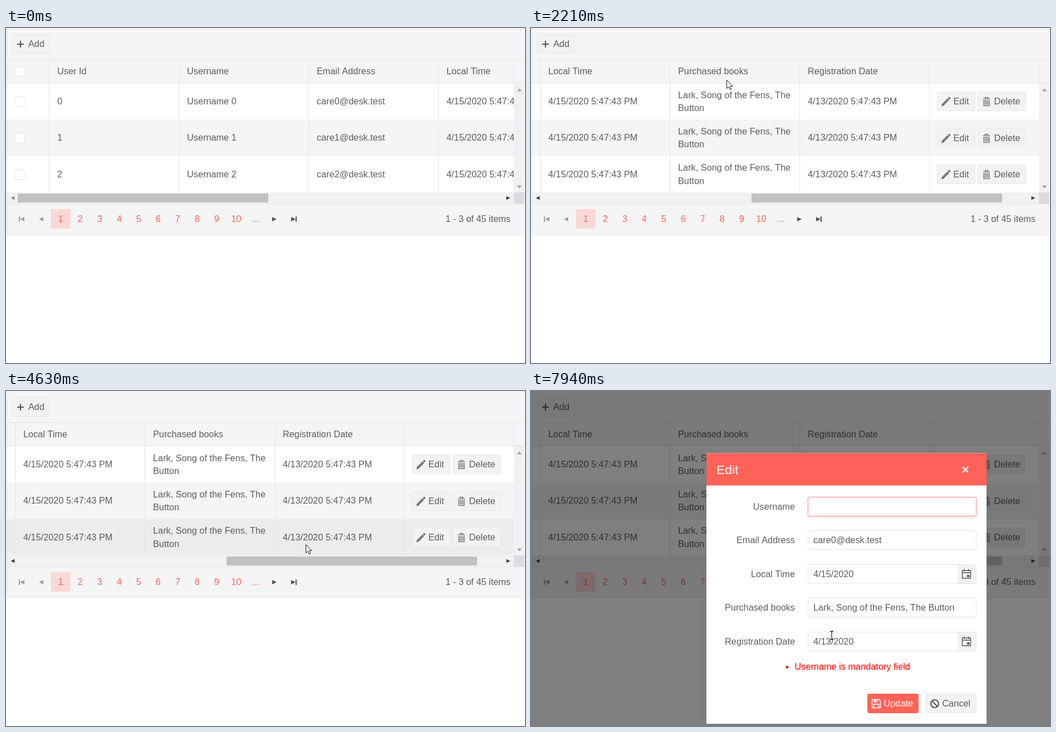
An HTML page with a canvas for the animation above (8 s loop, 932 by 601 pixels).

```html
<!DOCTYPE html>
<html lang="en">
<head>
<meta charset="utf-8">
<title>Grid with popup editing</title>
<style>
html, body { margin: 0; width: 932px; height: 601px; overflow: hidden; background: #fff; }
canvas { display: block; }
</style>
</head>
<body>
<canvas id="stage" width="932" height="601"></canvas>
<script>
const ctx = document.getElementById('stage').getContext('2d');
const LOOP = 8000, TICK = 110.5;
const FONT = '"Liberation Sans", Arial, sans-serif';
const INK = '#5d5d5d', ICON = '#555', ACCENT = '#ff6358', PANEL = '#f5f5f5', LINE = '#e4e4e4';
const BOOKS = ['Lark, Song of the Fens, The', 'Button'];
const COLUMNS = ['User Id', 'Username', 'Email Address', 'Local Time', 'Purchased books', 'Registration Date', ''];
const TRAVEL = 375, SCROLL_MAX = 760;

// Pointer path: [tick, x, y]
const PATH = [
  [0, 140, 309], [2, 95, 306], [3, 95, 306], [13, 437.5, 322], [15, 470, 329],
  [16, 455, 298], [17, 425, 240], [18, 390, 160], [19, 351, 93], [22, 282, 62],
  [24, 279, 66], [27, 400, 88], [30, 596, 60], [31, 588, 44], [33, 570, 38],
  [36, 546, 68], [38, 541, 190], [39, 539, 255], [41, 538, 275], [42, 620, 225],
  [43, 745, 142], [46, 745, 142], [48, 731, 142], [51, 601, 224], [53, 601, 224],
  [59, 327, 206], [68, 327, 206], [71, 540, 438.5]
];

function pointerAt(k) {
  const i = PATH.findIndex(p => p[0] > k);
  if (i < 0) return PATH[PATH.length - 1].slice(1);
  const a = PATH[i - 1], b = PATH[i], u = (k - a[0]) / (b[0] - a[0]);
  return [a[1] + (b[1] - a[1]) * u, a[2] + (b[2] - a[2]) * u];
}

function rect(color, x, y, w, h) {
  ctx.fillStyle = color;
  ctx.fillRect(x, y, w, h);
}

function box(fill, border, x, y, w, h) {
  ctx.beginPath();
  ctx.roundRect(x + .5, y + .5, w - 1, h - 1, 2);
  ctx.fillStyle = fill;
  ctx.fill();
  ctx.strokeStyle = border;
  ctx.lineWidth = 1;
  ctx.stroke();
}

function text(str, x, cy, color = INK, align = 'left', size = 16.31) {
  ctx.font = `${size}px ${FONT}`;
  ctx.textAlign = align;
  ctx.fillStyle = color;
  ctx.fillText(str, x, Math.round(cy + size * .36));
}

function poly(color, ...pts) {
  ctx.beginPath();
  for (let i = 0; i < pts.length; i += 2) ctx.lineTo(pts[i], pts[i + 1]);
  ctx.closePath();
  ctx.fillStyle = color;
  ctx.fill();
}

function stroke(color, width, d) {
  ctx.strokeStyle = color;
  ctx.lineWidth = width;
  ctx.stroke(new Path2D(d));
}

function at(x, y, draw) {
  ctx.save();
  ctx.translate(x, y);
  draw();
  ctx.restore();
}

// Triangle pointing along +x for dir 1 and -x for dir -1
const sideArrow = (color, x, y, dir, r = 4) => poly(color, x - dir * r, y - r, x + dir * r, y, x - dir * r, y + r);
const upArrow = (color, x, y, dir) => poly(color, x - 4.5, y + dir * 2.5, x, y - dir * 2.5, x + 4.5, y + dir * 2.5);

const icons = {
  pencil() {
    poly(ICON, -8, 8.5, -6.5, 4, 3.2, -5.7, 5.8, -3.1, -3.8, 6.7);
    poly(ICON, 4, -6.6, 6, -8.4, 8.3, -6, 6.6, -4);
    stroke('#e4e4e4', .9, 'M-5 5 L4 -4');
  },
  trash() {
    stroke(ICON, 1.2, 'M-6.5 -5 H6.5 M-2.5 -5 V-7.5 H2.5 V-5 M-4.8 -3 V7.5 H4.8 V-3');
    stroke(ICON, 1, 'M-2.3 -3 V6 M0 -3 V6 M2.3 -3 V6');
  },
  calendar() {
    stroke(ICON, 1.4, 'M-7.5 -6.5 H7.5 V7.5 H-7.5 Z M-7.5 -2.5 H7.5 M-4 -9 V-5 M4 -9 V-5');
    rect(ICON, 1, 1.5, 4.5, 4);
  },
  floppy() {
    stroke('#fff', 1.4, 'M-7.5 -7.5 H5 L7.5 -5 V7.5 H-7.5 Z M-4.5 7 V1 H4.5 V7');
    rect('#fff', -4.5, -7.5, 7.5, 5);
    rect(ACCENT, 0, -6.5, 1.8, 3);
  },
  ban() {
    stroke(ICON, 2, 'M7 0 A7 7 0 1 1 -7 0 A7 7 0 1 1 7 0 M-5 -5 L5 5');
  }
};

function button(label, icon, x, cy, w, primary) {
  box(primary ? ACCENT : '#f2f2f2', primary ? ACCENT : '#e8e8e8', x, cy - 17.5, w, 35);
  at(x + 16, cy + .5, icons[icon]);
  text(label, x + 29.5, cy - .5, primary ? '#fff' : INK);
}

const checkbox = (x, cy) => box('#fff', LINE, x, cy - 9, 18, 18);

function drawColumns(scroll, hover) {
  ctx.save();
  ctx.beginPath();
  ctx.rect(2, 57, 910, 238);
  ctx.clip();
  const rowTop = r => 99 + 65.3 * r;
  for (let r = 0; r < 3; r++)
    rect(r === hover ? '#ececec' : r === 1 ? PANEL : '#fff', 2, Math.round(rowTop(r)), 910, 66);
  rect(PANEL, 2, 57, 910, 42);
  checkbox(16 - scroll, 78);
  COLUMNS.forEach((title, c) => {
    const edge = Math.round(77 + 233 * c - scroll);
    rect(LINE, edge, 57, 1, 238);
    text(title, edge + 15, 77);
  });
  for (let r = 0; r < 3; r++) {
    const cy = rowTop(r) + 32.3;
    const cell = (str, c, dy = 0) => text(str, Math.round(77 + 233 * c - scroll) + 15, cy + dy);
    checkbox(16 - scroll, Math.round(cy + 1));
    cell(String(r), 0);
    cell('Username ' + r, 1);
    cell(`care${r}@desk.test`, 2);
    cell('4/15/2020 5:47:43 PM', 3);
    BOOKS.forEach((line, i) => cell(line, 4, i ? 12 : -11.3));
    cell('4/13/2020 5:47:43 PM', 5);
    const x = Math.round(1489 - scroll), by = Math.round(cy) + .5;
    button('Edit', 'pencil', x, by, 69);
    button('Delete', 'trash', x + 73, by, 87);
  }
  ctx.restore();
}

function drawGrid(thumb, thumbColor, hover) {
  rect(PANEL, 1, 1, 930, 98);
  rect(LINE, 1, 1, 930, 1);
  box('#f2f2f2', '#e6e6e6', 11, 11, 68, 35);
  stroke(ICON, 2.2, 'M20 29 H32 M26 23 V35');
  text('Add', 40, 28.5);

  drawColumns(thumb * SCROLL_MAX / TRAVEL, hover);
  rect(LINE, 1, 56, 930, 1);
  rect(LINE, 1, 98, 930, 1);
  rect(LINE, 911, 57, 1, 42);

  rect('#f1f1f1', 912, 99, 19, 196);
  upArrow('#a3a3a3', 922, 111, 1);
  upArrow('#a3a3a3', 922, 285, -1);
  rect('#f1f1f1', 1, 295, 911, 20);
  rect('#dcdcdc', 912, 295, 19, 20);
  sideArrow(thumb > 0 ? '#444' : '#8c8c8c', 12, 305, -1, 3.5);
  sideArrow('#444', 902, 305, 1, 3.5);
  rect(thumbColor, 21 + thumb, 297, 450, 16);

  rect(PANEL, 1, 315, 930, 56);
  rect(LINE, 1, 315, 930, 1);
  rect(LINE, 1, 370, 930, 1);
  rect(LINE, 1, 1, 1, 370);
  rect('#fad8d6', 81, 325, 35, 35);
  for (let i = 1; i <= 11; i++)
    text(i > 10 ? '...' : i, 63.4 + 35 * i, 342.5, ACCENT, 'center');
  rect('#a0a0a0', 23, 338, 2, 10);
  sideArrow('#a0a0a0', 29, 343, -1);
  sideArrow('#a0a0a0', 63, 343, -1);
  sideArrow(ICON, 482, 343, 1);
  sideArrow(ICON, 516, 343, 1);
  rect(ICON, 520, 338, 2, 10);
  text('1 - 3 of 45 items', 906, 342.5, INK, 'right');
}

function shadow(color, blur, dy, draw) {
  ctx.save();
  ctx.shadowColor = color;
  ctx.shadowBlur = blur;
  ctx.shadowOffsetY = dy;
  draw();
  ctx.restore();
}

function drawDialog({ focused, invalid, selectFrom }) {
  const top = invalid ? 111.5 : 128, bottom = invalid ? 597 : 581;
  rect('rgba(0,0,0,.5)', 0, 0, 932, 601);
  shadow(focused ? 'rgba(128,128,128,.3)' : 'rgba(0,0,0,.35)', 8, 1,
    () => rect('#fff', 315, top, 503, bottom - top));
  rect(ACCENT, 315, top, 503, 58);
  text('Edit', 333, top + 28.8, '#fff', 'left', 22.8);
  at(780, top + 29.5, () => stroke('#fff', 2.4, 'M-5 -5 L5 5 M5 -5 L-5 5'));

  const values = ['Username 0', 'care0@desk.test', '4/15/2020', BOOKS.join(' '), '4/13/2020'];
  values.forEach((value, i) => {
    const cy = Math.floor(top + 95.5 + 60.6 * i), first = i === 0;
    text(COLUMNS[i + 1], 474, cy, INK, 'right');
    const field = () => box('#fff', first && invalid ? '#ff8f87' : LINE, 497, cy - 17, 303, 35);
    if (first && focused) shadow(invalid ? 'rgba(255,99,88,.18)' : 'rgba(0,0,0,.1)', 5, 2, field);
    else field();
    if (i === 2 || i === 4) {
      rect('#f2f2f2', 766, cy - 16, 33, 33);
      at(782, cy + .5, icons.calendar);
    }
    if (first && invalid) return;
    text(value, 507, cy);
    if (first && selectFrom < 597) {
      ctx.save();
      ctx.beginPath();
      ctx.rect(selectFrom, cy - 9, 597 - selectFrom, 19);
      ctx.clip();
      rect(ACCENT, 497, cy - 9, 303, 19);
      text(value, 507, cy, '#fff');
      ctx.restore();
    }
  });

  if (invalid) {
    ctx.beginPath();
    ctx.arc(460, 495.5, 2.4, 0, 7);
    ctx.fillStyle = '#f00';
    ctx.fill();
    text('Username is mandatory field', 473.5, 493.7, '#f00');
  }
  button('Update', 'floppy', 604, bottom - 36.5, 92, true);
  button('Cancel', 'ban', 709, bottom - 36.5, 91);
}

function drawPointer(x, y, pressed, beam) {
  at(x, y, () => {
    if (pressed) {
      ctx.beginPath();
      ctx.arc(0, 0, 14, 0, 7);
      ctx.fillStyle = 'rgba(250,244,110,.9)';
      ctx.fill();
    }
    if (beam) {
      stroke('#222', 1.3, 'M-3 -7.5 H-1 L0 -6.5 L1 -7.5 H3 M0 -6.5 V6.5 M-3 7.5 H-1 L0 6.5 L1 7.5 H3');
      return;
    }
    const d = 'M.5 .5 V15.5 L4 12.3 L6.4 17.7 L8.8 16.6 L6.5 11.4 H11 Z';
    ctx.fillStyle = '#fff';
    ctx.fill(new Path2D(d));
    stroke('#111', 1, d);
  });
}

function draw(time) {
  const k = Math.floor((time - 88) / TICK);
  const [x, y] = pointerAt(Math.max(k, 0));
  const dragging = k >= 3 && k <= 15;
  const pressed = dragging || k === 45 || (k >= 53 && k <= 59);
  const thumb = k < 3 ? 0 : dragging ? Math.min(x - 95, TRAVEL) : TRAVEL;
  const overThumb = k >= 0 && k < 46 && y > 297 && y < 313;
  const hover = k >= 0 && k < 46 && !dragging && y > 99 && y < 295 ? Math.floor((y - 99) / 65.3) : -1;

  rect('#fff', 0, 0, 932, 601);
  drawGrid(thumb, dragging ? '#787878' : overThumb ? '#a8a8a8' : '#c1c1c1', hover);
  if (k >= 46) drawDialog({
    focused: k >= 53,
    invalid: k >= 64,
    selectFrom: k >= 53 ? Math.max(x, 507) : Infinity
  });
  if (k >= 0) drawPointer(x, y, pressed, k >= 51);
}

const start = performance.now();
function frame() {
  draw((performance.now() - start) % LOOP);
  requestAnimationFrame(frame);
}
frame();
</script>
</body>
</html>
```
